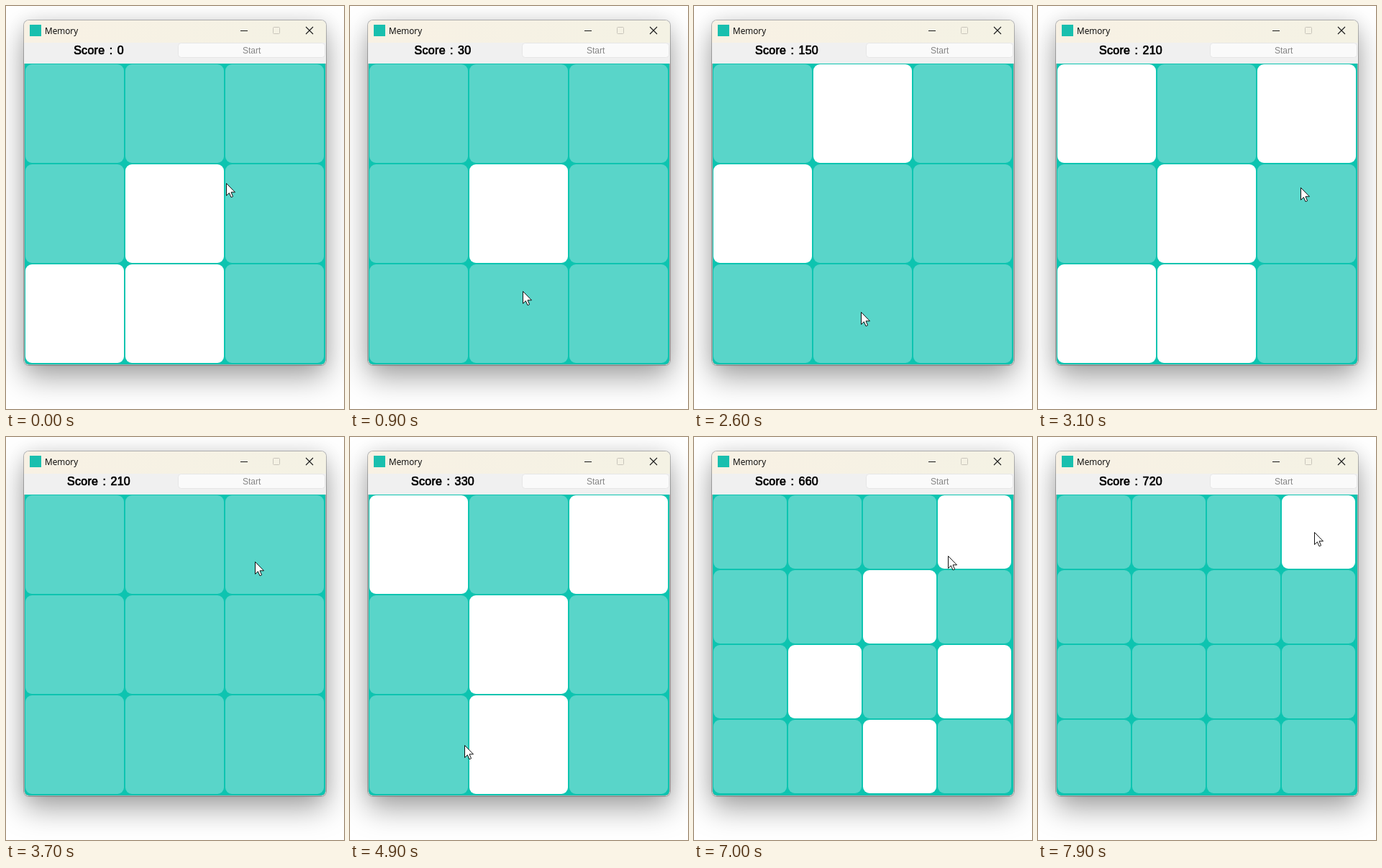
Animation of 470x560 px, one loop 8 s. Source, as an HTML page:

```html
<!DOCTYPE html>
<html lang="en">
<head>
<meta charset="utf-8">
<title>Memory</title>
<style>
  html, body { margin: 0; width: 100%; height: 100%; overflow: hidden; background: #fff; }
  .window {
    position: absolute; left: 25px; top: 20px; width: 420px; height: 479px;
    border-radius: 7px; overflow: hidden;
    background: linear-gradient(90deg, #f8f1e4, #f4f2e4);
    box-shadow: 0 0 0 1px rgba(0,0,0,.25), 0 17px 40px rgba(0,0,0,.36), 0 0 24px rgba(0,0,0,.08);
  }
  .bar { position: absolute; top: 31px; width: 100%; height: 29px; background: #f0f0f0; }
  .board {
    position: absolute; top: 60px; left: 0; right: 0; bottom: 0; background: #0dc4b0;
    border: solid #a5aeac; border-width: 0 1px 1px; border-radius: 0 0 7px 7px;
  }
  svg { position: absolute; left: 0; top: 0; }
  .score {
    font: 16px "Liberation Sans", Arial, sans-serif; letter-spacing: .3px; word-spacing: 1.5px;
    stroke: #000; stroke-width: .7px;
  }
  .start { font: 12px "Liberation Sans", Arial, sans-serif; fill: #858585; }
  .title { font: 11.8px "Open Sans", "Noto Sans", sans-serif; fill: #000; }
</style>
</head>
<body>
<div class="window"><div class="bar"></div><div class="board"></div></div>
<svg width="470" height="560" viewBox="0 0 470 560">
  <rect x="33" y="26" width="16" height="16" fill="#19bfae"/>
  <text class="title" x="54" y="39">Memory</text>
  <g fill="none" stroke="#1a1a1a">
    <path d="M326 34.5h10"/>
    <rect x="371.5" y="29.5" width="9" height="9" rx="1" stroke="#c9c5bb"/>
    <path d="M417 29l10 10M427 29l-10 10" stroke-width="1.1"/>
  </g>
  <text class="score" id="score" x="129" y="67" text-anchor="middle"></text>
  <rect x="239.5" y="51.5" width="204" height="20" rx="4" fill="#fafafa" stroke="#e6e6e6"/>
  <text class="start" x="341.7" y="66" text-anchor="middle">Start</text>
  <g id="cells"></g>
  <path id="cursor" d="M.5 .5v17l3.9-3.7 2.6 6 2.6-1.1-2.6-5.9h5.5z" fill="#fff" stroke="#111" stroke-linejoin="round"/>
</svg>
<script>
const LOOP = 8000, STEP = 100, SETTLE = 200;

// A round shows its cells until `hide`, then they are clicked in order, one every `gap` ms.
// The cursor waits for the first click at `rest`.
const rounds = [
  { start: -100, hide: 500, gap: 250, size: 3, rest: [251, 337], order: [4, 7, 6] },
  { start: 1300, hide: 1900, gap: 240, size: 3, rest: [222, 177], order: [1, 3, 7, 5] },
  { start: 3000, hide: 3700, gap: 265, size: 3, rest: [346, 173], order: [2, 0, 4, 7, 6] },
  { start: 5200, hide: 5900, gap: 120, size: 4, rest: [100, 350], order: [8, 12, 13, 10, 6] },
  { start: 6700, hide: 7500, gap: 400, size: 4, rest: [384, 132], order: [3, 6, 9, 14, 11] },
];

const clickTime = (round, i) => round.hide + round.gap * (i + 1);
const points = size => 30 * (size - 2);

function cellBox(size, i) {
  const pitch = Math.floor(417 / size);
  return { x: 27 + i % size * pitch, y: 81 + Math.floor(i / size) * pitch, side: pitch - 2 };
}

function cellCentre(size, i) {
  const { x, y, side } = cellBox(size, i);
  return [x + side / 2, y + side / 2];
}

// Cursor stops follow from the clicks.
const stops = [{ at: 0, point: [306, 246] }];
for (const round of rounds) {
  stops.push({ at: round.hide - SETTLE, point: round.rest });
  round.order.forEach((cell, i) => stops.push({
    at: clickTime(round, i),
    point: i ? cellCentre(round.size, cell) : round.rest,
  }));
}

const byId = id => document.getElementById(id);
const cells = Array.from({ length: 16 }, () => {
  const rect = document.createElementNS("http://www.w3.org/2000/svg", "rect");
  return byId("cells").appendChild(rect);
});

function setAttributes(node, attributes) {
  for (const [name, value] of Object.entries(attributes)) node.setAttribute(name, value);
}

function cursorAt(time) {
  const next = stops.findIndex(stop => stop.at > time);
  const from = stops[next - 1], to = stops[next];
  const p = (time - from.at) / (to.at - from.at), ease = p * p * (3 - 2 * p);
  return from.point.map((v, axis) => Math.round(v + (to.point[axis] - v) * ease));
}

function draw(time) {
  const begun = rounds.filter(round => round.start <= time);
  const round = begun[begun.length - 1];
  const { size } = round;
  const clicked = r => r.order.filter((_, i) => clickTime(r, i) <= time);
  const showing = time >= round.start + STEP && time < round.hide;
  const lit = showing ? round.order : clicked(round);

  cells.forEach((cell, i) => {
    const { x, y, side } = cellBox(size, i);
    setAttributes(cell, {
      x, y, width: side, height: side, rx: 9,
      fill: lit.includes(i) ? "#fff" : "#59d5c9",
      visibility: i < size ** 2 ? "visible" : "hidden",
    });
  });

  const score = begun.reduce((sum, r) => sum + points(r.size) * clicked(r).length, 0);
  byId("score").textContent = `Score : ${score}`;
  byId("cursor").setAttribute("transform", `translate(${cursorAt(time)})`);
}

const origin = performance.now();
function tick() {
  const elapsed = (performance.now() - origin) % LOOP;
  draw(Math.floor(elapsed / STEP) * STEP);
  requestAnimationFrame(tick);
}
tick();
</script>
</body>
</html>
```
